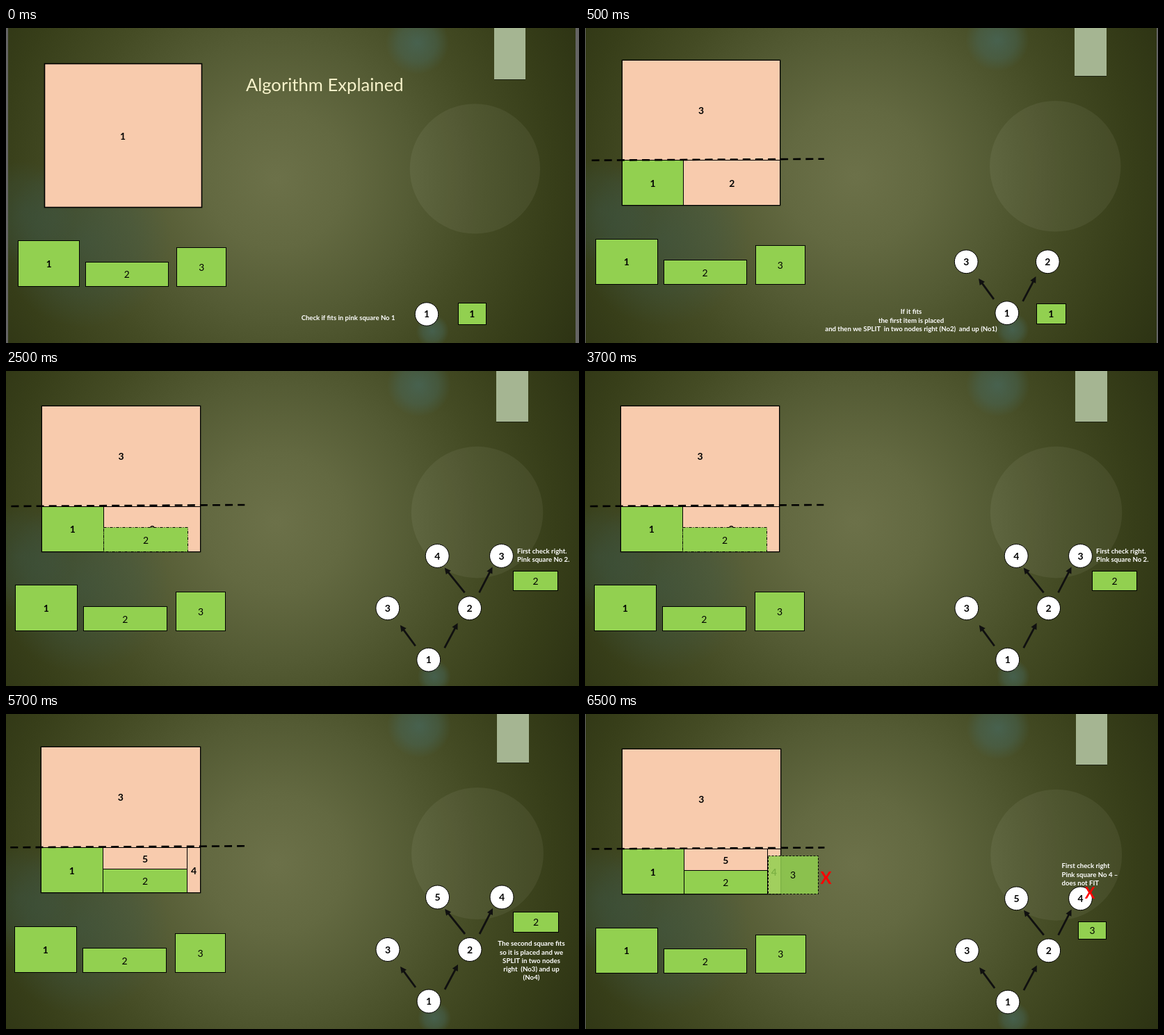
Recreate the animation shown at these times as an HTML page with a canvas. Size 824x454 px, loop 8000 ms.

```html
<!DOCTYPE html>
<html lang="en">
<head>
<meta charset="utf-8">
<title>Algorithm Explained</title>
<style>
html, body { margin: 0; width: 100%; height: 100%; overflow: hidden; background: #3b4220; }
canvas { display: block; }
</style>
</head>
<body>
<canvas id="stage" width="824" height="454"></canvas>
<script>
const ctx = document.getElementById('stage').getContext('2d');
const PINK = '#f8cbad', GREEN = '#92d050', RED = '#f00';

// Each step shows the slide with a slightly different zoom and offset.
const steps = [
  { start: 0,    scale: 0.9863, x: 55, y: 51,   draw: intro },
  { start: 500,  scale: 0.9924, x: 53, y: 46.5, draw: firstSplit },
  { start: 2500, scale: 0.9977, x: 51, y: 50,   draw: checkSecond },
  { start: 4500, scale: 1,      x: 50, y: 47,   draw: secondSplit },
  { start: 6500, scale: 0.9947, x: 53, y: 50,   draw: checkThird }
];
let view = steps[0];
const mapX = x => view.x + (x - 50) * view.scale;
const mapY = y => view.y + (y - 47) * view.scale;
const snap = v => Math.floor(v) + 0.5;

function text(str, x, y, { size = 14, weight = 700, color = '#000', align = 'center' } = {}) {
  const px = size * view.scale;
  ctx.font = `${weight} ${px}px Lato, Carlito, sans-serif`;
  ctx.textAlign = align;
  ctx.fillStyle = color;
  ctx.fillText(str, mapX(x), mapY(y) + px * 0.36);
}

function note(lines, x, y, align = 'center') {
  lines.forEach((line, i) =>
    text(line, x, y + i * 12.2, { size: 9.7, color: '#fff', align }));
}

function box(x1, y1, x2, y2, fill, { width = 1, dash = [], alpha = 1 } = {}) {
  const left = snap(mapX(x1)), top = snap(mapY(y1));
  const w = snap(mapX(x2)) - left, h = snap(mapY(y2)) - top;
  ctx.globalAlpha = alpha;
  ctx.fillStyle = fill;
  ctx.fillRect(left, top, w, h);
  ctx.globalAlpha = 1;
  ctx.setLineDash(dash);
  ctx.lineWidth = width;
  ctx.strokeStyle = '#000';
  ctx.strokeRect(left, top, w, h);
  ctx.setLineDash([]);
}

function labelBox(str, x1, y1, x2, y2, fill, weight = 700, style) {
  box(x1, y1, x2, y2, fill, style);
  text(str, (x1 + x2) / 2, (y1 + y2) / 2 + 0.5, { weight });
}

function disc(x, y, r, fill) {
  ctx.beginPath();
  ctx.arc(mapX(x), mapY(y), r * view.scale, 0, 7);
  ctx.fillStyle = fill;
  ctx.fill();
}

function node(str, x, y) {
  disc(x, y, 17, '#fff');
  ctx.lineWidth = 1;
  ctx.strokeStyle = '#000';
  ctx.stroke();
  text(str, x, y);
}

function arrow(x1, y1, x2, y2) {
  const angle = Math.atan2(y2 - y1, x2 - x1);
  const length = Math.hypot(x2 - x1, y2 - y1);
  ctx.save();
  ctx.translate(mapX(x1), mapY(y1));
  ctx.scale(view.scale, view.scale);
  ctx.rotate(angle);
  ctx.fillStyle = '#101010';
  ctx.fillRect(0, -1.4, length - 6, 2.8);
  ctx.beginPath();
  ctx.moveTo(length, 0);
  ctx.lineTo(length - 9, -4.5);
  ctx.lineTo(length - 9, 4.5);
  ctx.fill();
  ctx.restore();
}

function radial(x, y, r, stops) {
  const g = ctx.createRadialGradient(mapX(x), mapY(y), 0, mapX(x), mapY(y), r);
  stops.forEach(([at, color]) => g.addColorStop(at, color));
  return g;
}

function glow(x, y, r, rgb, alpha) {
  disc(x, y, r, radial(x, y, r * view.scale, [
    [0, `rgba(${rgb},${alpha})`], [0.6, `rgba(${rgb},${alpha * 0.6})`], [1, `rgba(${rgb},0)`]
  ]));
}

function background() {
  ctx.fillStyle = '#646464';
  ctx.fillRect(0, 0, 824, 454);
  const left = Math.round(mapX(-2.3)), right = Math.round(mapX(825));
  ctx.fillStyle = radial(388, 215, 500, [
    [0, '#6c7149'], [0.2, '#636941'], [0.4, '#545b34'],
    [0.6, '#444b24'], [0.8, '#373e19'], [1, '#2c3213']
  ]);
  ctx.fillRect(left, 0, right - left, 454);
  ctx.save();
  ctx.beginPath();
  ctx.rect(left, 0, right - left, 454);
  ctx.clip();
  glow(110, 308, 125, '62,94,88', 0.38);
  glow(20, 265, 75, '62,94,88', 0.3);
  glow(594, 17, 46, '72,108,100', 0.65);
  glow(616, 438, 24, '72,108,100', 0.65);
  disc(678, 201, 95, 'rgba(255,255,225,.06)');
  ctx.restore();
  const tabX = Math.round(mapX(706)), tabEnd = Math.round(mapX(752)), tabY = Math.round(mapY(70));
  ctx.fillStyle = '#a5b592';
  ctx.fillRect(tabX, 0, tabEnd - tabX, tabY);
  ctx.fillStyle = '#1c2110';
  ctx.fillRect(tabX, tabY, tabEnd - tabX, 1);
}

function items() {
  labelBox('1', 12, 306.5, 101.5, 372.5, GREEN);
  labelBox('2', 110.5, 337.5, 230.5, 372.5, GREEN, 400);
  labelBox('3', 243.5, 316.5, 315.5, 372.5, GREEN, 400);
}

function bin() {
  box(50.2, 47.2, 279.5, 257.5, PINK, { width: 1.6 });
}

function splitBin() {
  bin();
  labelBox('3', 50.2, 47.2, 279.5, 192.6, PINK);
  labelBox('1', 50.2, 192.6, 139.6, 257.5, GREEN);
}

function packedBin() {
  splitBin();
  labelBox('5', 139.6, 192.6, 260.6, 223.4, PINK);
  labelBox('2', 139.6, 223.4, 260.6, 257.5, GREEN, 400);
  labelBox('4', 260.6, 192.6, 279.5, 257.5, PINK);
}

function cutLine() {
  ctx.beginPath();
  ctx.moveTo(mapX(6.3), mapY(192.3));
  ctx.lineTo(mapX(343), mapY(190.3));
  ctx.setLineDash([11, 7.1]);
  ctx.lineWidth = 2.6;
  ctx.strokeStyle = '#000';
  ctx.stroke();
  ctx.setLineDash([]);
}

function lowerTree(left, right) {
  arrow(589, 394, 567, 364);
  arrow(631, 397, 650, 361);
  node('1', 608, 414);
  node(left, 549, 339.5);
  node(right, 667, 339.5);
}

function fullTree(left, right) {
  lowerTree('3', '2');
  arrow(660, 317, 631, 281);
  arrow(681, 317, 700, 280);
  node(left, 620.5, 264);
  node(right, 713, 264);
}

function intro() {
  bin();
  text('1', 164.6, 153);
  text('Algorithm Explained', 458.8, 78, { size: 26, weight: 400, color: '#f7f3cb' });
  node('1', 607.6, 413.5);
  labelBox('1', 653.5, 397.6, 694.2, 428.5, GREEN);
  note(['Check if fits in pink square No 1'], 493.1, 418.6);
}

function firstSplit() {
  splitBin();
  labelBox('2', 139.6, 192.6, 279.5, 257.5, PINK);
  cutLine();
  lowerTree('3', '2');
  labelBox('1', 650.8, 400.4, 693.4, 429.7, GREEN);
  note(['If it fits', 'the first item is placed',
    'and then we SPLIT  in two nodes right (No2)  and up (No1)'], 469.2, 412.3);
}

function checkSecond() {
  splitBin();
  labelBox('2', 139.6, 192.6, 279.5, 257.5, PINK);
  labelBox('2', 140.2, 223.4, 260.6, 257.5, GREEN, 400, { dash: [4, 2, 1, 2] });
  cutLine();
  fullTree('4', '3');
  labelBox('2', 729.7, 285.7, 794.5, 314, GREEN, 400);
  note(['First check right.', 'Pink square No 2.'], 735.6, 256.5, 'left');
}

function secondSplit() {
  packedBin();
  cutLine();
  fullTree('5', '4');
  labelBox('2', 729.7, 285.7, 794.5, 314, GREEN, 400);
  note(['The second square fits', 'so it is placed and we', 'SPLIT in two nodes',
    'right  (No3) and up', '(No4)'], 755.5, 331);
}

function checkThird() {
  packedBin();
  labelBox('3', 261.2, 202, 333.6, 257.5, GREEN, 400, { dash: [3, 2], alpha: 0.85 });
  cutLine();
  text('X', 345.1, 234, { size: 24, color: RED });
  fullTree('5', '4');
  text('X', 726.6, 256.1, { size: 22, color: RED });
  labelBox('3', 709.6, 297.5, 750.7, 323, GREEN, 400);
  note(['First check right', 'Pink square No 4 –', 'does not FIT'], 685.9, 216.9, 'left');
}

function render() {
  const time = performance.now() % 8000;
  view = steps.filter(step => step.start <= time).pop();
  background();
  items();
  view.draw();
  requestAnimationFrame(render);
}
render();
</script>
</body>
</html>
```
